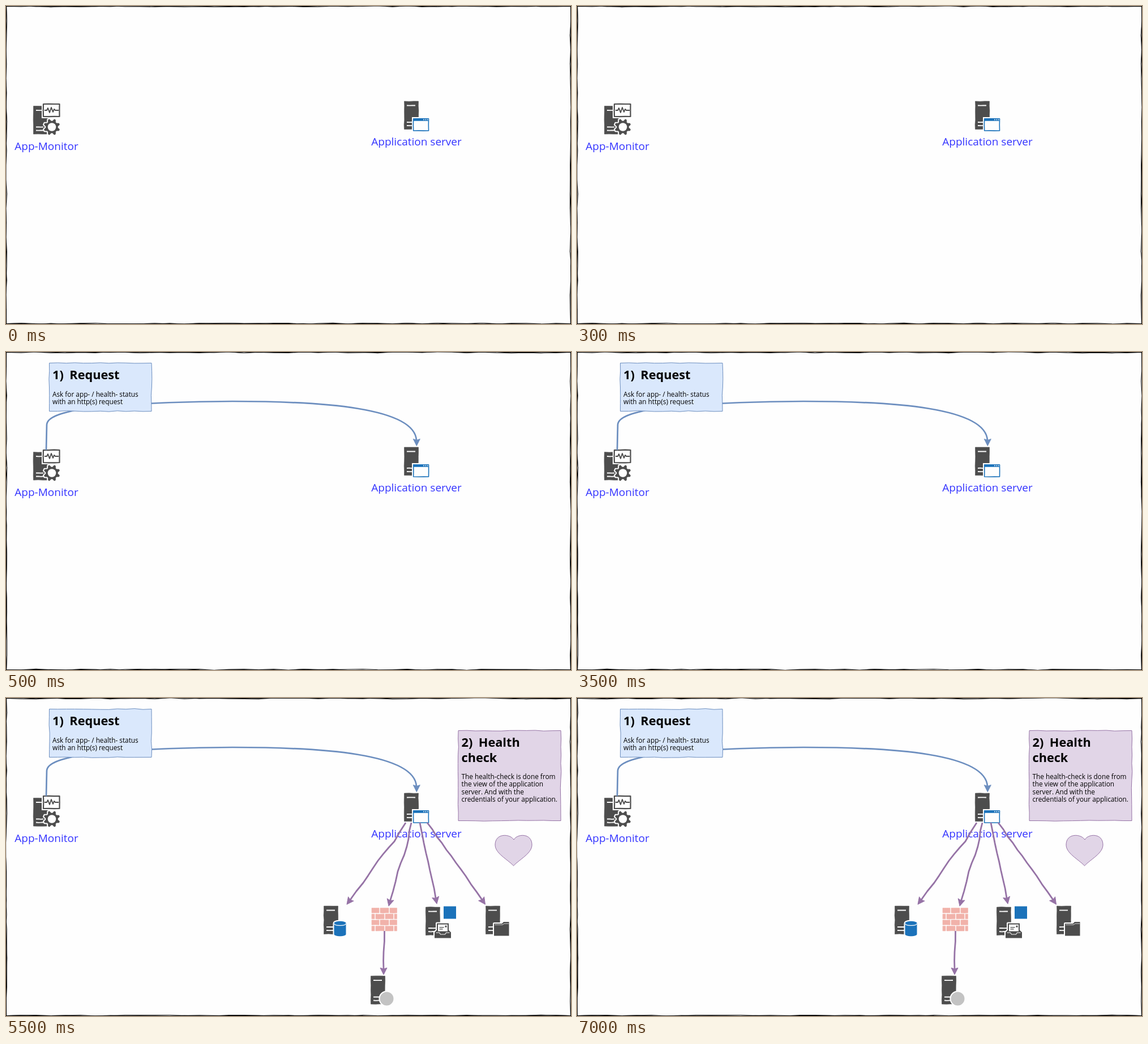
Animation, 998 px wide and 561 px high, one loop 8000 ms. Source, as an HTML page:

```html
<!DOCTYPE html>
<html lang="en">
<head>
<meta charset="utf-8">
<title>Health check</title>
<style>
  html, body { margin: 0; height: 100%; overflow: hidden; background: #fefefe; }
  svg { display: block; width: 100vw; height: 100vh; }
  text { font-family: "Open Sans", sans-serif; font-size: 11.8px; }
  .label { font-size: 19px; fill: #33f; text-anchor: middle; }
  .title { font-size: 21.7px; font-weight: 700; word-spacing: 5px; }
</style>
</head>
<body>
<svg id="stage" viewBox="0 0 998 561"></svg>
<script>
const GRAY = '#4d4d4d', BLUE = '#1b72ba', WHITE = '#fefefe';
const SKY = { fill: '#dae8fc', line: '#6c8ebf' };
const PLUM = { fill: '#e1d5e7', line: '#9673a6' };
const LOOP = 8000, STARTS = [0, 500, 5500];

let seed = 1;
function jitter(amount) {
  seed = (seed * 16807) % 2147483647;
  return (seed / 2147483647 * 2 - 1) * amount;
}

const path = (d, fill = 'none', stroke = 'none', width = 1) =>
  `<path d="${d}" fill="${fill}" stroke="${stroke}" stroke-width="${width}" stroke-linejoin="round"/>`;
const rect = (x, y, w, h, fill, stroke = 'none', width = 1) =>
  path(`M${x} ${y}h${w}v${h}h${-w}z`, fill, stroke, width);
const circle = (x, y, r, fill, stroke = 'none', width = 1) =>
  `<circle cx="${x}" cy="${y}" r="${r}" fill="${fill}" stroke="${stroke}" stroke-width="${width}"/>`;
const text = (x, y, words, style = '') => `<text x="${x}" y="${y}" class="${style}">${words}</text>`;
const lines = (x, y, gap, list, style) =>
  list.map((words, i) => text(x, y + i * gap, words, style)).join('');

// Path data through the points with hand-drawn wobble along each edge.
function sketch(points, wobble = 0.6, step = 12) {
  let d = 'M' + points[0];
  for (let i = 1; i < points.length; i++) {
    const [x0, y0] = points[i - 1], [x1, y1] = points[i];
    const length = Math.hypot(x1 - x0, y1 - y0);
    const count = Math.max(1, Math.round(length / step));
    for (let k = 1; k <= count; k++) {
      const off = k < count ? jitter(wobble) : 0, t = k / count;
      const x = x0 + (x1 - x0) * t - (y1 - y0) / length * off;
      const y = y0 + (y1 - y0) * t + (x1 - x0) / length * off;
      d += `L${x.toFixed(1)} ${y.toFixed(1)}`;
    }
  }
  return d;
}
const corners = (x, y, w, h) => [[x, y], [x + w, y], [x + w, y + h], [x, y + h], [x, y]];
const sketchRect = (x, y, w, h, fill, stroke, wobble, step, width) =>
  path(sketch(corners(x, y, w, h), wobble, step) + 'z', fill, stroke, width);

function arrowHead(x, y, angle, color) {
  return `<path transform="translate(${x} ${y}) rotate(${angle})" d="M0 0L-12 -6L-10 0L-12 6z"
    fill="${color}" stroke="${color}" stroke-linejoin="round"/>`;
}
function arrow(points) {
  const [[x0, y0], [x1, y1]] = points.slice(-2);
  const angle = Math.atan2(y1 - y0, x1 - x0);
  const shaft = [...points.slice(0, -1), [x1 - 9 * Math.cos(angle), y1 - 9 * Math.sin(angle)]];
  return path(sketch(shaft, 0.9, 16), 'none', PLUM.line, 2.8) +
    arrowHead(x1, y1, angle * 180 / Math.PI, PLUM.line);
}

function server(x, y) {
  const slot = (dy, w) => path(sketch([[x + 5, y + dy], [x + 5 + w, y + dy]], 0.3, 5), 'none', WHITE, 1.8);
  return sketchRect(x + 0.5, y, 25, 49.5, GRAY, GRAY, 0.4, 8, 0.6) +
    slot(7.5, 15) + slot(37, 13) + slot(43, 13);
}

function gear(x, y) {
  const points = [];
  for (let i = 0; i < 32; i++) {
    const r = i % 4 < 2 ? 14.5 : 10.8, a = (i + 1.5) * Math.PI / 16;
    points.push([(x + r * Math.cos(a)).toFixed(1), (y + r * Math.sin(a)).toFixed(1)]);
  }
  const d = 'M' + points.join('L') + 'z';
  return path(d, WHITE, WHITE, 4) + path(d, GRAY) + circle(x, y, 7.3, WHITE);
}

function monitorServer() {
  return server(48, 176.5) + rect(63, 170, 34, 28, WHITE) +
    sketchRect(66, 173, 28.5, 22, WHITE, GRAY, 0.3, 10, 2.2) +
    path('M68 184h4l2-4 3 8 3-9 3 8 2-5 2 2h6', 'none', GRAY, 1.9) +
    gear(81, 213.5);
}

function appServer() {
  return server(703, 168) + rect(717, 196, 32, 27, WHITE) +
    sketchRect(719.7, 199, 26.8, 21, WHITE, BLUE, 0.3, 10, 1.6) +
    rect(719, 198.3, 28, 4.5, BLUE) +
    [738, 741.5, 745].map(x => circle(x, 200.5, 0.9, WHITE)).join('');
}

function databaseServer() {
  const can = 'M579.5 397.5v19c0 5 21 5 21 0v-19c0-5-21-5-21 0z';
  return server(561, 367) + path(can, BLUE, WHITE, 4) + path(can, BLUE) +
    path('M580 398c0 4.5 20 4.5 20 0', 'none', WHITE, 1.2);
}

function firewall() {
  let bricks = '';
  for (let row = 0; row < 4; row++) {
    const joints = row % 2 ? [646, 653, 670, 686, 692.5] : [646, 661, 678, 692.5];
    for (let i = 1; i < joints.length; i++) {
      bricks += sketchRect(joints[i - 1], 370.5 + row * 10.6, joints[i] - joints[i - 1] - 2, 8.6,
        '#f1b2aa', '#f1b2aa', 0.4, 6, 0.6);
    }
  }
  return bricks;
}

function mailServer() {
  const tray = 'M761 397.5h21v12l4 4v10h-29v-10l4-4z';
  return server(741, 369) + path(tray, WHITE, WHITE, 4) + path(tray, GRAY) +
    rect(763, 399.5, 17, 12, WHITE) + rect(765.5, 404, 8, 1.3, GRAY) +
    rect(765.5, 407, 6, 1.3, GRAY) + rect(775.5, 401.5, 3, 3, GRAY) +
    path('M759.5 414h6l2 3h8l2-3h6', 'none', WHITE, 1.1) +
    rect(773, 367.5, 22, 22, BLUE);
}

function fileServer() {
  const folder = 'M862 398h14l3-3h9.5v24.5h-26.5z';
  return server(847, 367) + path(folder, WHITE, WHITE, 4) + path(folder, GRAY) +
    path('M863 400h14l3-2h8', 'none', WHITE, 0.8);
}

function directoryServer() {
  return server(644, 490.5) + circle(672.5, 530.5, 13, '#c3c3c3', WHITE, 2);
}

function requestStep() {
  return path('M71 173L72 128C73 108 135 100 165 97Q258 88 400 87C560 87 722 98 725 156',
      'none', SKY.line, 2.7) +
    arrowHead(725.3, 165.5, 90, SKY.line) +
    sketchRect(76.5, 19.5, 180.5, 85, SKY.fill, SKY.line, 0.8, 15) +
    text(82, 48, '1) Request', 'title') +
    lines(82, 79, 13.4, ['Ask for app- / health- status', 'with an http(s) request']);
}

function healthStep() {
  const checks = [
    [[706, 220], [686, 253], [657, 287], [631, 326], [602, 364]],
    [[716, 220], [708, 262], [692, 306], [676, 367]],
    [[731, 220], [742, 274], [752, 318], [761, 363]],
    [[744, 220], [778, 268], [812, 314], [846.5, 364]],
    [[668.5, 411], [667, 448], [667, 488]]
  ];
  return databaseServer() + firewall() + mailServer() + fileServer() + directoryServer() +
    checks.map(arrow).join('') +
    sketchRect(799, 57.5, 181, 159, PLUM.fill, PLUM.line, 0.8, 15) +
    lines(804.5, 86, 26.5, ['2) Health', 'check'], 'title') +
    lines(804.5, 143, 13.4, ['The health-check is done from', 'the view of the application',
      'server. And with the', 'credentials of your application.']) +
    path('M897 250C890 239 864 238 864 259C864 274 885 284 896.5 296C908 284 929 274 929 259C929 238 903 239 897 250z',
      PLUM.fill, PLUM.line);
}

function border() {
  return [0, 1].map(() =>
    path(sketch(corners(0.5, 0.5, 997, 560), 1.1, 26), 'none', '#000', 1.2)).join('');
}

function scene(step) {
  seed = 4711 + step * 977;
  return '<g>' + border() + monitorServer() + appServer() +
    text(71.5, 253.5, 'App-Monitor', 'label') + text(725, 246, 'Application server', 'label') +
    (step > 0 ? requestStep() : '') + (step > 1 ? healthStep() : '') + '</g>';
}

const stage = document.getElementById('stage');
stage.innerHTML = STARTS.map((_, step) => scene(step)).join('');
const scenes = [...stage.children];
const begin = performance.now();

function draw() {
  const time = (performance.now() - begin) % LOOP;
  const current = STARTS.filter(start => start <= time).length - 1;
  scenes.forEach((group, i) => { group.style.display = i === current ? '' : 'none'; });
  requestAnimationFrame(draw);
}
draw();
</script>
</body>
</html>
```
